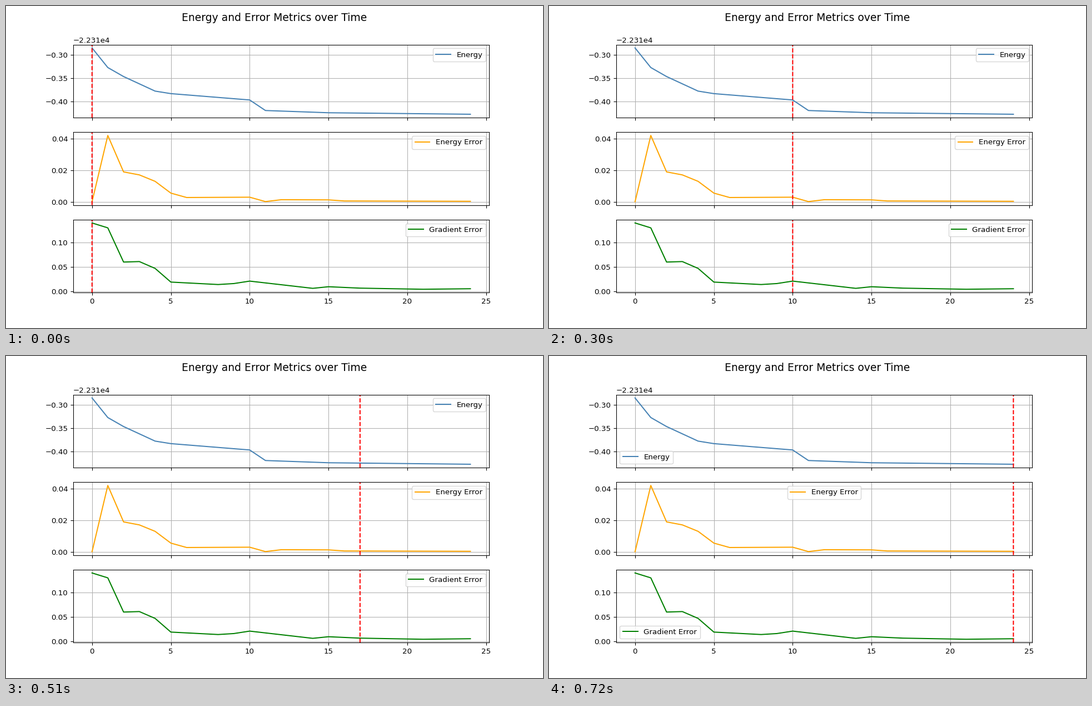
Write a matplotlib script that moves like this. It is 966 px wide and 580 px high and loops after 0.75 s.

```python
import matplotlib.pyplot as plt
import numpy as np
from matplotlib.animation import FuncAnimation

WIDTH, HEIGHT, DPI = 966, 580, 96.6
STEPS = 25
BASE = -22310


def curve(*keys):
    """Straight segments through (step, value) key points."""
    x, y = zip(*keys)
    return np.interp(np.arange(STEPS), x, y)


energy = BASE - curve(
    (0, .2852), (1, .3272), (2, .3465), (4, .3777), (5, .3831),
    (10, .3967), (11, .4193), (15, .4241), (24, .4273))
energy_error = curve(
    (0, 0), (1, .0422), (2, .019), (3, .0171), (4, .013), (5, .0055),
    (6, .0027), (10, .0029), (11, .0001), (12, .0013), (15, .0012),
    (16, .0005), (24, .0003))
gradient_error = curve(
    (0, .14), (1, .13), (2, .06), (3, .061), (4, .047), (5, .019),
    (8, .014), (9, .016), (10, .021), (14, .0062), (15, .0095),
    (17, .0066), (21, .0043), (24, .0054))

SERIES = [
    (energy, "Energy", "steelblue"),
    (energy_error, "Energy Error", "orange"),
    (gradient_error, "Gradient Error", "green"),
]

plt.rcParams["font.family"] = "DejaVu Sans"
# the small excess keeps rounding from losing a pixel
size = ((WIDTH + .01) / DPI, (HEIGHT + .01) / DPI)
fig, axes = plt.subplots(3, 1, sharex=True, figsize=size, dpi=DPI)
fig.suptitle("Energy and Error Metrics over Time", fontsize=14)

markers = []
for ax, (values, label, color) in zip(axes, SERIES):
    ax.plot(values, color=color, label=label)
    markers.append(ax.axvline(0, color="red", linestyle="--", snap=False))
    ax.grid(True)
    # "best" lets each legend jump away when the marker reaches it
    ax.legend(loc="best")


def update(step):
    for marker in markers:
        marker.set_xdata([step, step])
    return markers


anim = FuncAnimation(fig, update, frames=STEPS, interval=30, repeat=True,
                     repeat_delay=0, blit=False)
plt.show()
```
